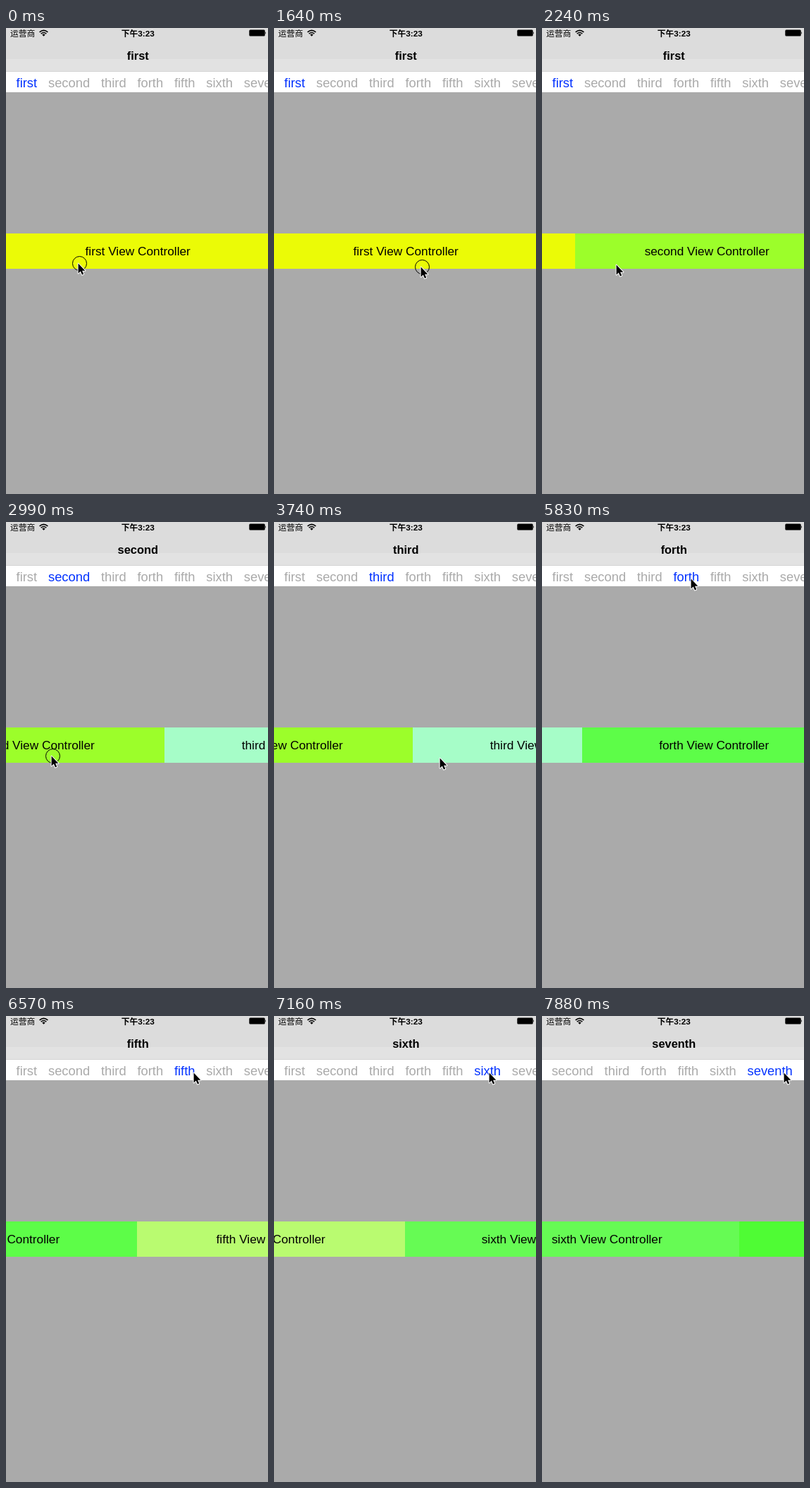
An HTML page for the animation above (8 s loop, 372 by 660 pixels).

```html
<!DOCTYPE html>
<html lang="en">
<head>
<meta charset="utf-8">
<title>Paged tabs</title>
<style>
  html, body { margin: 0; width: 100%; height: 100%; overflow: hidden; background: #aaa; }
  svg { display: block; width: 372px; height: 660px; }
  text { font-family: "Liberation Sans", "Noto Sans CJK SC", "Noto Sans CJK", sans-serif; }
  .mid { text-anchor: middle; }
  .tab { font-size: 18.35px; fill: #aaa; }
  .tab.on { fill: #0433ff; }
  .label { font-size: 17.25px; }
  .title { font-size: 16.4px; font-weight: bold; }
  .status { font-size: 11.8px; }
</style>
</head>
<body>
<svg viewBox="0 0 372 660">
  <rect width="372" height="660" fill="#aaa"/>
  <rect width="372" height="44" fill="#dcdcdc"/>
  <rect y="44" width="372" height="17" fill="#e2e2e2"/>
  <rect y="61" width="372" height="1" fill="#d4d4d4"/>
  <rect y="62" width="372" height="29" fill="#fff"/>
  <text class="status" x="6" y="11.5">运营商</text>
  <g fill="none" stroke="#000" stroke-width="1.6">
    <path d="M47.6 5.8Q53.5 .8 59.4 5.8"/>
    <path d="M49.7 8.1Q53.5 4.9 57.3 8.1"/>
  </g>
  <path d="M51.3 9.4Q53.5 7.6 55.7 9.4L53.5 11.8Z"/>
  <text class="status mid" x="187.3" y="11.5" font-weight="bold">下午3:23</text>
  <rect x="345.3" y="2.5" width="22.4" height="9" rx="1.5"/>
  <path d="M368.2 5.2Q370 7 368.2 8.8Z"/>
  <text class="title mid" id="title" x="187.3" y="45"></text>
  <g id="tabs"></g>
  <g id="pages"></g>
  <g id="cursor">
    <circle id="touch" cx="2.5" cy=".5" r="10" fill="none" stroke="#000"/>
    <path d="M.6 .6V14.4L3.8 11.6L6 16.6L8.2 15.6L6.1 10.8H10.4Z"
      stroke="#fff" stroke-width="2" stroke-linejoin="round" paint-order="stroke"/>
  </g>
</svg>
<script>
const LOOP = 8000, STEP = 148.6, GLIDE = 1.99;
const PAGE = 375, TAB_LEFT = 14.6, TAB_GAP = 15.8, TAP_Y = 80;
const names = ["first", "second", "third", "forth", "fifth", "sixth", "seventh", "eighth"];
const colors = ["#ebfb06", "#9cfe2a", "#a6fdc8", "#5dfd48", "#b9fb70", "#66fb54", "#4ffc34"];

const drags = [
  { down: 11, up: 13.8, done: 16, from: [208, 338], to: [62, 334], page: 1 },
  { down: 18, up: 20.2, done: 22, from: [214, 338], to: [49, 330], page: 2 },
  { down: 22, up: 24.93, done: 27, from: [51, 332], to: [235, 334], page: 1 },
  { down: 27, up: 29.4, done: 31.75, from: [235, 334], to: [51, 332], page: 2 }
];
const taps = [
  { reach: 36, done: 37.5, x: 204, page: 3 },
  { reach: 42, done: 43, x: 266, page: 4 },
  { reach: 46, done: 47, x: 305, page: 5 },
  { reach: 50, done: 52.345, x: 343, page: 6 }
];
const hovers = [[0, 102, 333], [2.5, 60, 335], [31, 116, 270]];

// Pointer tip: time, x, y
const path = [
  ...hovers,
  ...drags.flatMap(d => [[d.down, ...d.from], [d.up, ...d.to]]),
  ...taps.flatMap(k => [[k.reach, k.x, TAP_Y], [k.done + 1.1, k.x, TAP_Y]])
].sort((a, b) => a[0] - b[0]);

const $ = id => document.getElementById(id);
const clamp = u => Math.min(1, Math.max(0, u));
const mix = (a, b, u) => a + (b - a) * u;
const glide = t => { const u = clamp(t / GLIDE); return u * u * (3 - 2 * u); };

function add(parent, tag, attrs, text = "") {
  const el = document.createElementNS("http://www.w3.org/2000/svg", tag);
  for (const k in attrs) el.setAttribute(k, attrs[k]);
  el.textContent = text;
  return parent.appendChild(el);
}

let tabX = TAB_LEFT, lastCentre = 0;
const tabs = names.map((name, i) => {
  const el = add($("tabs"), "text", { class: "tab", x: tabX, y: 84 }, name);
  const width = el.getComputedTextLength();
  if (i === taps[3].page) lastCentre = tabX + width / 2;
  tabX += width + TAB_GAP;
  return el;
});
colors.forEach((fill, i) => {
  add($("pages"), "rect", { x: i * PAGE, y: 291, width: PAGE, height: 50, fill });
  add($("pages"), "text", { class: "label mid", x: i * PAGE + 187.2, y: 322 },
    names[i] + " View Controller");
});

function pointer(t) {
  const i = path.findIndex(k => k[0] > t);
  if (i < 0) return path[path.length - 1].slice(1);
  const [a, b] = [path[i - 1], path[i]];
  const u = (t - a[0]) / (b[0] - a[0]);
  return [mix(a[1], b[1], u), mix(a[2], b[2], u)];
}

function pageAt(t) {
  let page = 0;
  for (const d of drags) {
    if (t < d.down) break;
    const held = page + (d.from[0] - pointer(Math.min(t, d.up))[0]) / PAGE;
    const left = 1 - clamp((t - d.up) / (d.done - d.up));
    page = mix(d.page, held, left * left);
  }
  for (const k of taps) page = mix(page, k.page, glide(t - k.done));
  return page;
}

function touching(t) {
  return t < 0.5 || drags.some(d => t >= d.down && t < d.up) ||
    taps.some(k => t > k.done - 0.5 && t < k.done);
}

function draw(t) {
  const [x, y] = pointer(t).map(Math.round);
  const last = [...drags, ...taps].filter(g => g.done <= t).pop();
  const current = last ? last.page : 0;
  const strip = (lastCentre - PAGE / 2) * glide(t - taps[3].done);
  $("title").textContent = names[current];
  tabs.forEach((el, i) => el.classList.toggle("on", i === current));
  $("tabs").setAttribute("transform", `translate(${-strip})`);
  $("pages").setAttribute("transform", `translate(${-Math.round(pageAt(t) * PAGE)})`);
  $("cursor").setAttribute("transform", `translate(${x} ${y})`);
  $("touch").setAttribute("visibility", touching(t) ? "visible" : "hidden");
}

const start = performance.now();
function tick() {
  draw(Math.floor((performance.now() - start) % LOOP / STEP));
  requestAnimationFrame(tick);
}
tick();
</script>
</body>
</html>
```
